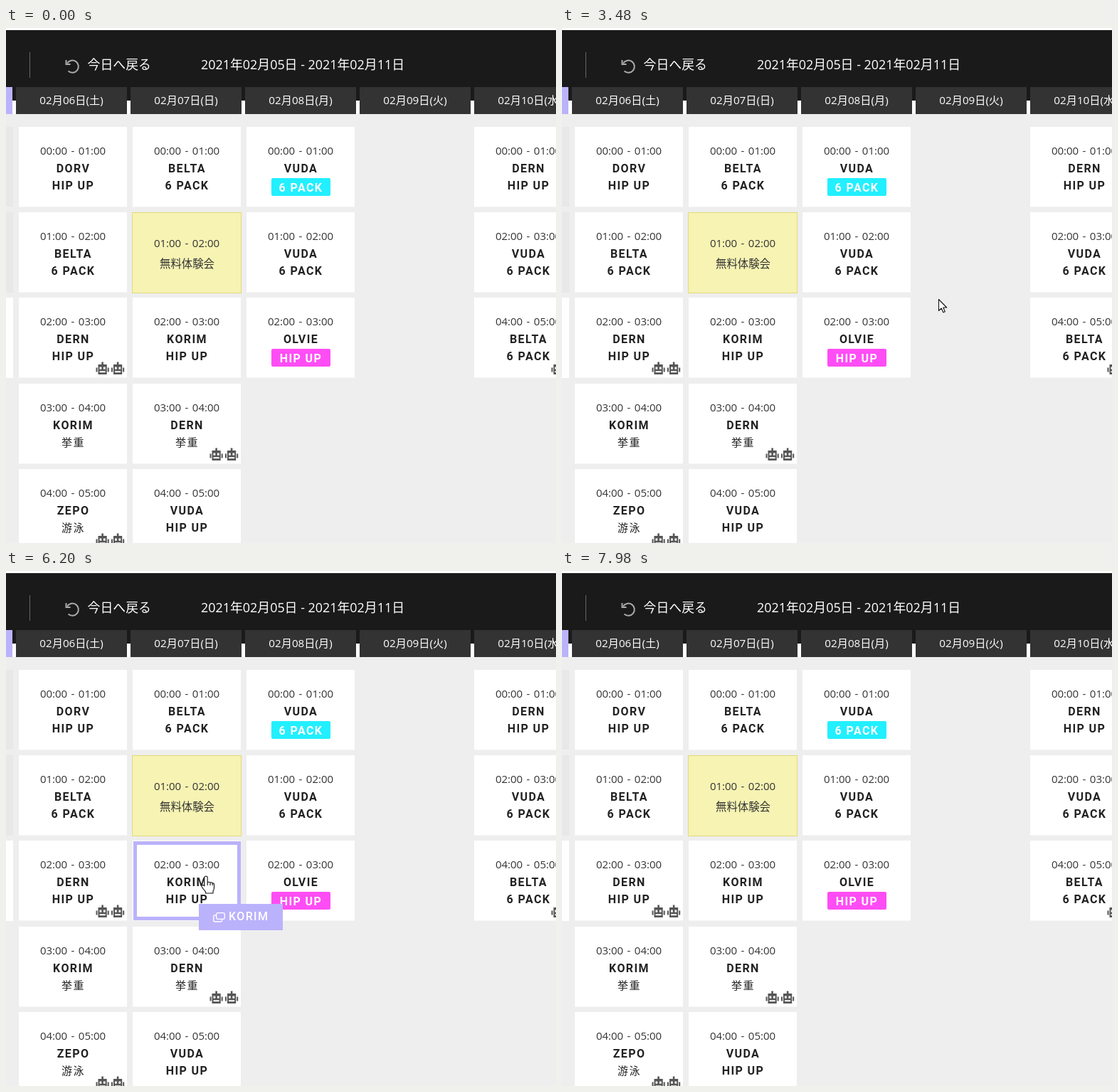
Animation, 773 px wide and 724 px high, one loop 8.51 s. Source, as an HTML page:

```html
<!DOCTYPE html>
<html lang="ja">
<head>
<meta charset="utf-8">
<title>Class schedule</title>
<style>
  html, body { margin: 0; width: 100%; height: 100%; overflow: hidden; background: #eee; }
  #stage { position: relative; width: 773px; height: 724px; overflow: hidden; }
  #stage > * { position: absolute; }
  #board { left: 0; top: 0; }
  text { text-anchor: middle; font-family: "Open Sans", "Noto Sans CJK JP", "Noto Sans CJK", sans-serif; fill: #333; }
  .bar { font-size: 17.9px; fill: #fff; text-anchor: start; }
  .day { font-size: 15.2px; fill: #fff; }
  .time { font-size: 15px; word-spacing: 1.5px; }
  .trial { font-size: 15.4px; font-weight: 300; }
  .name, .tip { font: 700 16px Roboto, "Noto Sans CJK JP", "Noto Sans CJK", sans-serif; letter-spacing: 1.4px; }
  .name { fill: #222; }
  .cjk { font-size: 15px; font-weight: 500; }
  .badge { fill: #fff; }
  .ring { box-sizing: border-box; width: 151px; height: 111px; border: 5px solid #bab2fb; }
  .tip { height: 37px; line-height: 36px; background: #bab2fb; color: #fff; font-weight: 500; text-align: center; }
  .tip svg { vertical-align: -3px; }
  #cursor { left: 0; top: 0; overflow: visible; }
  #cursor path { fill: #fff; stroke: #111; stroke-width: 1.1; stroke-linejoin: round; }
</style>
</head>
<body>
<div id="stage">
  <svg id="board" width="773" height="724">
    <defs>
      <g id="bot" fill="#555">
        <path d="M7.8 0h2.6v4h-2.6zM0 8h2v6H0zM16.2 8h2v6h-2z"/>
        <path fill-rule="evenodd" d="M3 3.5h12.2v14H3zM5 7v3.2h2.8V7zM10.4 7v3.2h2.8V7zM5 12.8v2h8.2v-2z"/>
      </g>
    </defs>
    <rect width="773" height="724" fill="#eee"/>
    <rect width="773" height="121" fill="#fff"/>
    <rect y="3" width="773" height="99" fill="#1a1a1a"/>
    <rect x="33" y="34" width="1" height="36" fill="#666"/>
    <g fill="none" stroke="#aaa" stroke-width="2">
      <path d="M86 49.5A8.6 8.6 0 1 1 87.5 60.5"/>
      <path d="M84.5 45v6h6"/>
    </g>
    <text class="bar" x="114.500" y="58">今日へ戻る</text>
    <text class="bar" x="274" y="58">2021年02月05日 - 2021年02月11日</text>
    <rect y="83" width="9" height="38" fill="#bab2fb"/>
    <g fill="#e8e8e8">
      <rect y="139" width="10" height="112"/>
      <rect y="259" width="10" height="113"/>
      <rect y="379" width="10" height="113" fill="#fff"/>
    </g>
  </svg>
  <svg id="cursor" width="1" height="1">
    <path id="arrow" d="M.5 .5V16.5L4.2 13 6.8 18.8 9.3 17.7 6.8 12H11.7Z"/>
    <path id="hand" d="M-2.2 14V2Q-2 0 0 0T2.2 2V9Q4 7.6 6 9 8 8.4 9.2 10 11.5 9.6 11.5 12V16Q11.5 19 10 21V24H-.5V22Q-4 18-6 14.5-6.4 12.5-4.6 12.6-3.2 12.8-2.2 14ZM2.2 9V13M6 9V13M9.2 10V13"/>
  </svg>
</div>
<script>
const LOOP = 8510, STEP = LOOP / 110, FADE = 300;
const CARD_W = 152, CARD_H = 112.5;
const [stage, board, cursor, arrow, hand] =
  ['stage', 'board', 'cursor', 'arrow', 'hand'].map(id => document.getElementById(id));

function add(tag, attrs, text) {
  const el = document.createElementNS('http://www.w3.org/2000/svg', tag);
  for (const k in attrs) el.setAttribute(k, attrs[k]);
  if (text) el.textContent = text;
  return board.appendChild(el);
}
const label = (cls, x, y, text) => add('text', { class: cls, x, y }, text);
const box = (x, y, width, height, fill, extra) => add('rect', { x, y, width, height, fill, ...extra });

function div(cls, x, y) {
  const el = document.createElement('div');
  el.className = cls;
  el.style.left = x + 'px';
  el.style.top = y + 'px';
  return stage.insertBefore(el, cursor);
}

[...'土日月火水'].forEach((weekday, i) => {
  const x = 14 + 161 * i;
  const date = String(6 + i).padStart(2, '0');
  box(x, 83, 156, 38, '#333');
  label('day', x + 78, 107, `02月${date}日(${weekday})`);
});

// one list per day, each entry: trainer/class/option
const schedule = [
  ['DORV/HIP UP', 'BELTA/6 PACK', 'DERN/HIP UP/bots', 'KORIM/挙重', 'ZEPO/游泳/bots'],
  ['BELTA/6 PACK', 'VUDA/無料体験会/trial', 'KORIM/HIP UP', 'DERN/挙重/bots', 'VUDA/HIP UP'],
  ['VUDA/6 PACK/#22efff', 'VUDA/6 PACK', 'OLVIE/HIP UP/#ff4df5'],
  [],
  ['DERN/HIP UP', 'VUDA/6 PACK', 'BELTA/6 PACK/bots']
];

const icon = '<svg width="17" height="14" fill="none" stroke="#fff" stroke-width="1.3">' +
  '<rect x="4.7" y=".7" width="11.6" height="8.6" rx="2"/>' +
  '<path d="M4.7 4H2.7q-2 0-2 2v5q0 2 2 2h8q2 0 2-2V9.3"/></svg> ';

function makeCard(entry, col, row) {
  const [name, kind, option = ''] = entry.split('/');
  const x = 18 + 160 * col, y = 139 + Math.round(120.2 * row), mid = x + CARD_W / 2;
  const hour = col === 4 ? row * 2 : row;
  const time = `0${hour}:00 - 0${hour + 1}:00`;
  if (option === 'trial') {
    box(x - .5, y + .5, CARD_W + 1, 113, '#f6f3b3', { stroke: '#e4da78' });
    label('time', mid, y + 49, time);
    label('trial', mid + .5, y + 77.5, kind);
  } else {
    const badge = option.startsWith('#');
    box(x, y, CARD_W, CARD_H, '#fff');
    if (badge) box(x + 35, y + 72, 83, 25, option, { rx: 2 });
    label('time', mid, y + 39, time);
    label('name', mid + .5, y + 63.5, name);
    const cls = 'name' + (badge ? ' badge' : '') + (kind.length === 2 ? ' cjk' : '');
    label(cls, mid + .5, y + (badge ? 91 : 88), kind);
  }
  if (option === 'bots') {
    for (const dx of [108.5, 130]) add('use', { href: '#bot', x: x + dx, y: y + 90.5 });
  }
  const ring = div('ring', x + 1, y + 1);
  const tip = div('tip', x + 93, y + 89);
  tip.innerHTML = icon + name;
  return { x, y, ring, tip };
}
const cards = schedule.flatMap((day, col) => day.map((entry, row) => makeCard(entry, col, row)));
for (const { tip } of cards) stage.insertBefore(tip, cursor);

// pointer stops: time, x, y
const stops = [
  [70, 664, 740], [850, 500, 300], [1050, 440, 310], [1640, 538, 386], [2260, 545, 390],
  [2400, 438, 405], [2540, 446, 420], [3110, 549, 380], [3300, 549, 380], [3480, 529, 381],
  [4030, 529, 381], [4570, 445, 332], [5500, 285, 330], [6200, 281, 429], [6740, 284, 336],
  [7130, 282, 453], [7980, 655, 740]
];

function pointer(t) {
  const next = stops.findIndex(s => s[0] > t);
  if (next < 1) return stops.at(next).slice(1);
  const [t0, x0, y0] = stops[next - 1], [t1, x1, y1] = stops[next];
  const k = (t - t0) / (t1 - t0), ease = k * k * (3 - 2 * k);
  return [x0 + (x1 - x0) * ease, y0 + (y1 - y0) * ease];
}

const inside = (card, [px, py]) =>
  px > card.x && px < card.x + CARD_W && py > card.y && py < card.y + CARD_H;

function draw(now) {
  const t = Math.floor((now % LOOP) / STEP + .1) * STEP;
  // a card is lit by the share of the last FADE ms spent over it
  const trail = Array.from({ length: 30 }, (_, i) => pointer(t - FADE * (i + .5) / 30));
  for (const card of cards) {
    const lit = trail.filter(p => inside(card, p)).length / trail.length;
    card.ring.style.display = card.tip.style.display = lit ? '' : 'none';
    card.ring.style.opacity = lit;
    card.tip.style.opacity = Math.sqrt(lit);
    card.tip.style.width = 118 * lit + 'px';
  }
  const at = pointer(t);
  const over = cards.some(card => inside(card, at));
  cursor.style.transform = `translate(${at[0]}px, ${at[1]}px)`;
  arrow.style.display = over ? 'none' : '';
  hand.style.display = over ? '' : 'none';
}

const begin = performance.now();
function tick() {
  draw(performance.now() - begin);
  requestAnimationFrame(tick);
}
tick();
</script>
</body>
</html>
```
